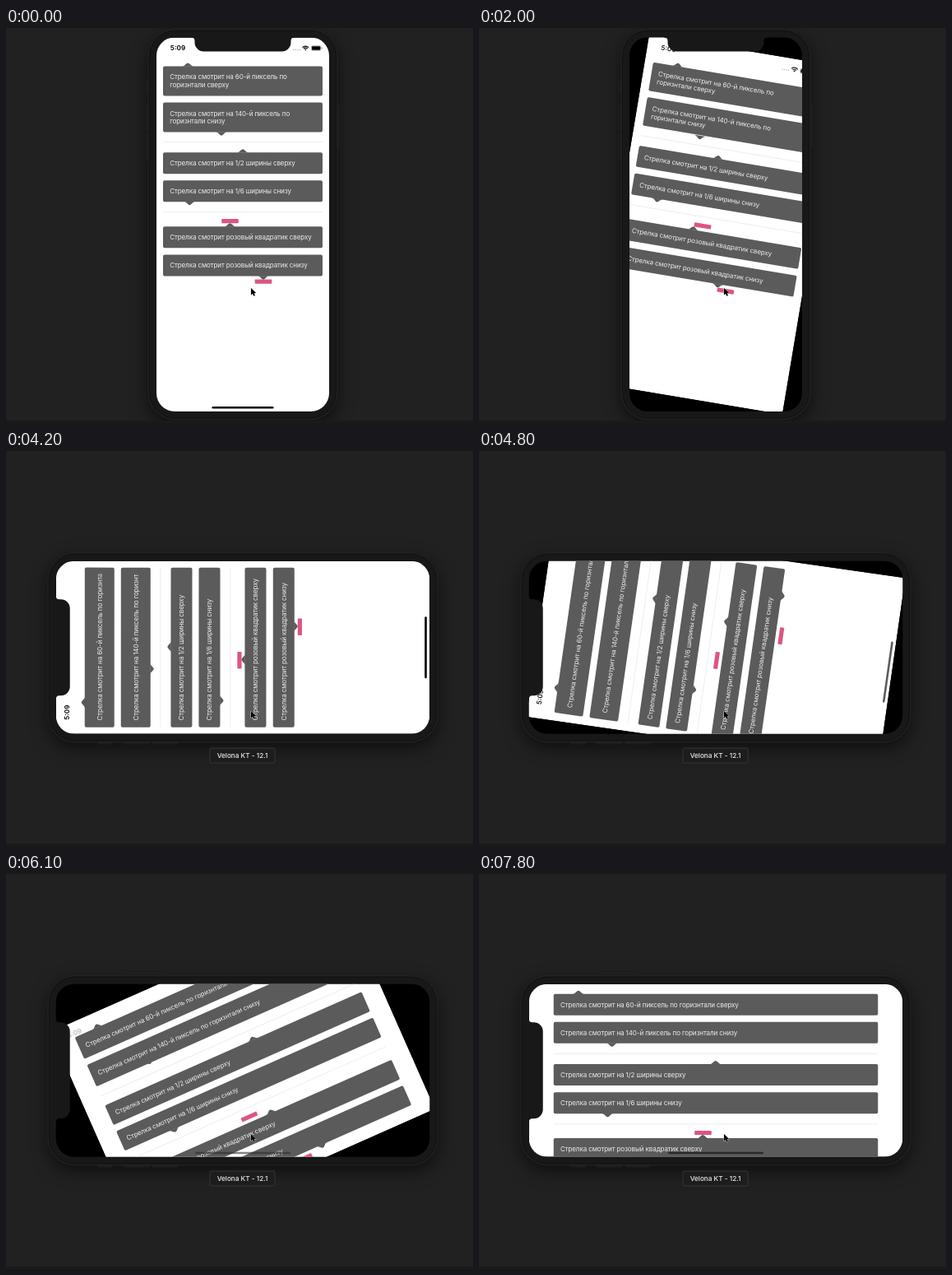
An HTML page with a canvas that plays this animation: 568x480 px, repeating every 8 s.

```html
<!DOCTYPE html>
<html lang="ru">
<head>
<meta charset="utf-8">
<title>Поворот экрана</title>
<style>
  html, body { margin: 0; width: 100%; height: 100%; overflow: hidden; background: #222122; }
  canvas { display: block; width: 568px; height: 480px; }
</style>
</head>
<body>
<canvas></canvas>
<script>
const W = 568, H = 480, LOOP = 8000, STEP = 100;
const CX = 288, CY = 238.7, LONG = 454.5, SHORT = 210;
const GREY = '#5b5b5b', PINK = '#dc5584', BODY = '#181818';
const FONT = 'Inter, Roboto, sans-serif';

const canvas = document.querySelector('canvas');
const ctx = canvas.getContext('2d');
const dpr = window.devicePixelRatio || 1;
canvas.width = W * dpr;
canvas.height = H * dpr;

// wide: 1 = landscape, 0 = portrait
const turns = [
  { at: 65, dur: 300, wide: 1, fadeAt: 365, fade: 500 },
  { at: 1768, dur: 300, wide: 0, fadeAt: 2068, fade: 400 },
  { at: 4170, dur: 3000, wide: 1, fadeAt: 5230, fade: 1500 }
];
const rest = { at: -9000, dur: 300, wide: 0, fadeAt: -8000, fade: 300 };

// y and h hold [portrait, landscape]; arrow gives the tip's offset inside a bar of width w
const bars = [
  { y: [35, 12], h: [36, 26], up: true, arrow: () => 30.2,
    lines: ['Стрелка смотрит на 60-й пиксель по', 'горизнтали сверху'] },
  { y: [79, 46], h: [36, 26], up: false, arrow: () => 71,
    lines: ['Стрелка смотрит на 140-й пиксель по', 'горизнтали снизу'] },
  { y: [139.7, 97.3], h: [26, 26], up: true, arrow: w => w / 2,
    lines: ['Стрелка смотрит на 1/2 ширины сверху'] },
  { y: [173.7, 131.5], h: [26, 26], up: false, arrow: w => w / 6,
    lines: ['Стрелка смотрит на 1/6 ширины снизу'] },
  { y: [229.7, 187.4], h: [26, 26], up: true, arrow: w => w / 2 - 15.5,
    lines: ['Стрелка смотрит розовый квадратик сверху'] },
  { y: [264, 221.6], h: [26, 26], up: false, arrow: w => w / 2 + 25,
    lines: ['Стрелка смотрит розовый квадратик снизу'] }
];
const rules = [[127, 84.7], [212, 170]];
const marks = [{ dx: -15.5, y: [220.6, 178.2] }, { dx: 25, y: [294, 251.5] }];

const clamp = v => Math.max(0, Math.min(1, v));
const mix = (a, b, k) => a + (b - a) * k;

function bezier(x, x1, y1, x2, y2) {
  if (x <= 0) return 0;
  if (x >= 1) return 1;
  const at = (a, b, s) => 3 * a * s * (1 - s) ** 2 + 3 * b * s * s * (1 - s) + s ** 3;
  let lo = 0, hi = 1;
  for (let i = 0; i < 30; i++) {
    const mid = (lo + hi) / 2;
    if (at(x1, x2, mid) < x) lo = mid; else hi = mid;
  }
  return at(y1, y2, lo);
}

function box(x, y, w, h, r, fill) {
  ctx.beginPath();
  ctx.roundRect(x, y, w, h, r);
  if (fill) {
    ctx.fillStyle = fill;
    ctx.fill();
  }
}

function outline(color, width) {
  ctx.strokeStyle = color;
  ctx.lineWidth = width;
  ctx.stroke();
}

function layer(draw, x = 0, y = 0, angle = 0, alpha = 1) {
  ctx.save();
  ctx.translate(x, y);
  ctx.rotate(angle);
  ctx.globalAlpha *= alpha;
  draw();
  ctx.restore();
}

function type(str, x, y, size, color, weight = 400, align = 'left', gap = 0) {
  ctx.font = `${weight} ${size}px ${FONT}`;
  ctx.letterSpacing = gap + 'px';
  ctx.textAlign = align;
  ctx.fillStyle = color;
  ctx.fillText(str, x, y);
}

// Chrome and notch are drawn upright around the centre
function chrome() {
  layer(() => {
    ctx.shadowColor = 'rgba(0,0,0,.55)';
    ctx.shadowBlur = 20 * dpr;
    ctx.shadowOffsetY = 7 * dpr;
    box(-115.5, -237.5, 231, 475, 33, BODY);
  });
  const keys = [[-117.3, -176, 17], [-117.3, -145, 31], [-117.3, -110, 31], [115, -145, 52]];
  for (const [x, y, h] of keys) {
    box(x, y, 2.3, h, 1, '#1a1a1a');
    outline('#292929', 0.5);
  }
  box(-115, -237, 230, 474, 33);
  outline('#292929', 0.8);
  box(-113.5, -235.5, 227, 471, 32);
  outline('#111', 0.8);
}

function notch() {
  const top = -LONG / 2 - 1, low = top + 18;
  ctx.beginPath();
  ctx.moveTo(-63, top);
  ctx.lineTo(-63, top + 1);
  ctx.quadraticCurveTo(-58.5, top + 1, -58.5, top + 5);
  ctx.arcTo(-58.5, low, -47, low, 11);
  ctx.arcTo(58.5, low, 58.5, top + 5, 11);
  ctx.lineTo(58.5, top + 5);
  ctx.quadraticCurveTo(58.5, top + 1, 63, top + 1);
  ctx.lineTo(63, top);
  ctx.fillStyle = BODY;
  ctx.fill();
}

function statusIcons() {
  for (let i = 0; i < 4; i++) box(166 + i * 2.5, 14.2, 1.5, 1.5, 0.75, '#b5b5b5');
  ctx.fillStyle = '#000';
  for (const r of [3.1, 5.2]) {
    ctx.beginPath();
    ctx.arc(181.3, 15.8, r, -Math.PI * 0.76, -Math.PI * 0.24);
    outline('#000', 1.2);
  }
  ctx.beginPath();
  ctx.moveTo(181.3, 16);
  ctx.arc(181.3, 15.8, 1.7, -Math.PI * 0.76, -Math.PI * 0.24);
  ctx.fill();
  box(188.4, 10.1, 11.6, 5.9, 1.5);
  outline('#777', 0.5);
  box(189, 10.7, 10.4, 4.7, 1, '#000');
  box(200.7, 12, 0.8, 2, 0.4, '#777');
}

// The arrow follows its own timing, so it can part from the edge of the bar
function bubble(bar, x, w, k, arrowK, tipX, wide) {
  const y = mix(...bar.y, k), h = mix(...bar.h, k);
  box(x, y, w, h, 2, GREY);
  layer(() => {
    if (!bar.up) ctx.scale(1, -1);
    ctx.beginPath();
    ctx.moveTo(-7, 0.3);
    ctx.bezierCurveTo(-3.8, 0, -2.2, -4, 0, -4);
    ctx.bezierCurveTo(2.2, -4, 3.8, 0, 7, 0.3);
    ctx.fill();
  }, x + tipX, bar.up ? y : y + mix(...bar.h, arrowK));
  layer(() => {
    ctx.beginPath();
    ctx.rect(x + 7.8, y, w - 15.6, h);
    ctx.clip();
    const lines = wide ? [bar.lines.join(' ')] : bar.lines;
    lines.forEach((line, i) => {
      const mid = y + h / 2 + (i - (lines.length - 1) / 2) * 9.7;
      type(line, x + 8.2, mid + 2.9, 8.1, '#ececec', 400, 'left', -0.14);
    });
  });
}

function page(turn, q, move) {
  const k = turn.wide ? q : 1 - q;
  const arrowK = turn.wide ? move : 1 - move;
  const w = mix(SHORT, LONG, k), h = mix(LONG, SHORT, k);
  const inset = mix(8, 30, k), barW = w - inset * 2;
  ctx.translate(-w / 2, -h / 2);
  ctx.beginPath();
  ctx.rect(0, 0, w, h);
  ctx.clip();
  ctx.fillStyle = '#fff';
  ctx.fillRect(0, 0, w, h);

  layer(() => {
    type('5:09', 26, 16, 8.2, '#000', 600, 'center');
    if (!turn.wide) statusIcons();
  }, 0, 0, 0, 1 - k);

  ctx.fillStyle = '#e7e7e7';
  for (const y of rules) ctx.fillRect(inset, mix(...y, k) - 0.2, barW, 0.7);
  for (const m of marks) box(w / 2 + m.dx - 10.3, mix(...m.y, k), 20.6, 5.2, 0.8, PINK);
  for (const bar of bars) {
    const tip = mix(bar.arrow(194), bar.arrow(394), arrowK);
    bubble(bar, inset, barW, k, arrowK, tip, turn.wide);
  }
  homeBar(w / 2, h, !turn.wide, clamp(1 - q * 4));
}

function homeBar(x, bottom, wide, alpha) {
  const len = wide ? 116 : 75;
  layer(() => box(x - len / 2, bottom - 6, len, 2.6, 1.3, wide ? '#2b2b2b' : '#000'), 0, 0, 0, alpha);
}

function cursor() {
  const pts = [[0, 0], [0, 8.6], [2, 6.8], [3.4, 9.8], [4.9, 9.1], [3.6, 6.2], [6.2, 6]];
  ctx.beginPath();
  pts.forEach(p => ctx.lineTo(...p));
  ctx.closePath();
  ctx.lineJoin = 'round';
  outline('#ddd', 0.9);
  ctx.fillStyle = '#000';
  ctx.fill();
}

function nameTag() {
  box(248, 361, 79, 18, 2, '#1d1d1d');
  outline('#3c3c3c', 0.8);
  type('Velona KT - 12.1', 287.5, 373, 8.2, '#ededed', 500, 'center');
}

function render(t) {
  const turn = turns.filter(s => s.at <= t).pop() || rest;
  const x = clamp((t - turn.at) / turn.dur);
  const q = bezier(x, 0.42, 0, 0.58, 1);
  const move = bezier(x * 1.58, 0.25, 0.1, 0.25, 1);
  const quarter = Math.PI / 2;
  const tilt = turn.wide ? -quarter : 0;
  const spin = (turn.wide ? -1 : 1) * quarter * (1 - q);
  const w = turn.wide ? LONG : SHORT, h = turn.wide ? SHORT : LONG;

  ctx.setTransform(dpr, 0, 0, dpr, 0, 0);
  ctx.fillStyle = '#222122';
  ctx.fillRect(0, 0, W, H);
  layer(chrome, CX, CY, tilt);
  layer(() => {
    box(-w / 2, -h / 2, w, h, 22, '#000');
    ctx.clip();
    layer(() => page(turn, q, move), 0, 0, spin);
    homeBar(0, h / 2, turn.wide, clamp((t - turn.fadeAt) / turn.fade));
  }, CX, CY);
  layer(notch, CX, CY, tilt);
  if (turn.wide) nameTag();
  ctx.fillStyle = '#1e181b';
  ctx.fillRect(0, 477, W, 3);
  layer(cursor, 298, 316);
}

function tick(now) {
  render(Math.floor((now % LOOP) / STEP) * STEP);
  requestAnimationFrame(tick);
}
requestAnimationFrame(tick);
</script>
</body>
</html>
```
